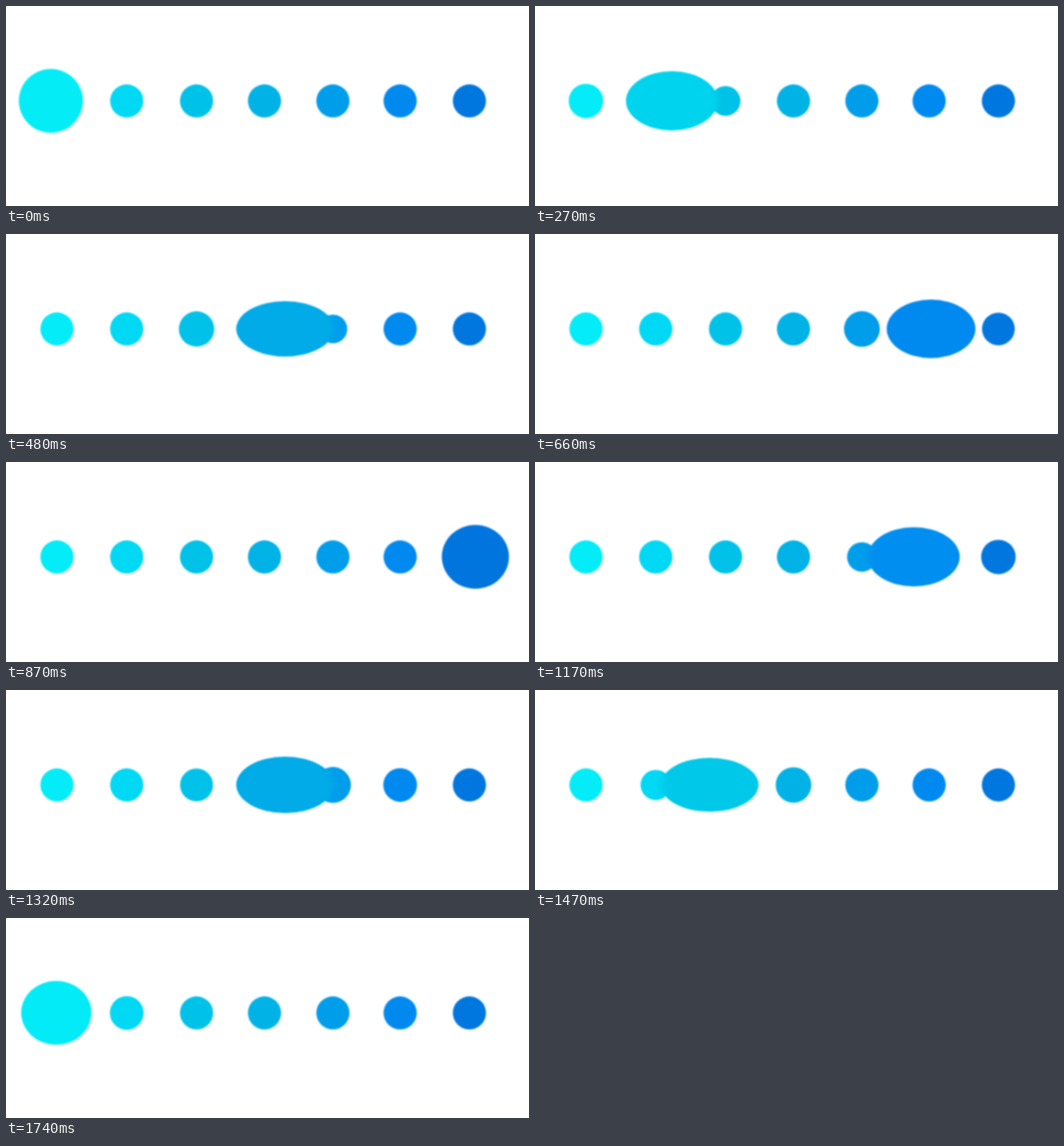
An HTML page without scripts that plays this animation: 746 px wide and 286 px high, repeating every 1770 ms.

```html
<!DOCTYPE html>
<html lang="en">
<head>
<meta charset="utf-8">
<title>Rolling drop</title>
<style>
  @property --f { syntax: "<number>"; inherits: true; initial-value: 0; }

  html, body { margin: 0; width: 100%; height: 100%; overflow: hidden; background: #fff; }

  /* --f counts 30 ms ticks; each leg of the trip takes 30 of them */
  svg {
    display: block; width: 100%; height: 100%;
    animation: tick 1770ms steps(59) infinite;
    --back: clamp(0, var(--f) - 29, 1);
    --leg: calc(var(--f) - 30 * var(--back));
    --q: calc(var(--leg) / 30);
    --ease: calc(var(--q) * var(--q) * (3 - 2 * var(--q)));
    --s: calc(var(--ease) + var(--back) * (1 - 2 * var(--ease)));
  }
  @keyframes tick { from { --f: 0; } to { --f: 59; } }

  /* --p: tick at which the drop passes; --n: ticks since then */
  circle {
    --n: calc(var(--leg) - var(--p) - var(--back) * (30 - 2 * var(--p)));
    --in: clamp(0, (var(--n) + 4.3) * 1.6, 4);
    --out: clamp(0, var(--n) * 3, 6);
    --rest: clamp(0, (var(--n) - 3.5) * 0.65, 2);
    cy: 135.8px;
    r: calc((23.7 - var(--in) + var(--out) - var(--rest)) * 1px);
  }

  .drop {
    cx: calc((64 + 607.5 * var(--s)) * 1px);
    cy: 135.6px;
    rx: calc((45.7 + min(24, 66 * min(var(--q), 1 - var(--q)))) * 1px);
    ry: calc((45.7 - max(0, min(11.4 * var(--q), (24 - var(--leg)) * 1.9))) * 1px);
    fill: rgb(
      calc(max(0, 4 - 40 * var(--s))),
      calc(237 - 120 * var(--s)),
      calc(min(max(247 - 46 * var(--s), 214 + 33 * var(--s)), 321 - 100 * var(--s))));
  }
</style>
</head>
<body>
<svg viewBox="0 0 746 286">
  <!-- melts touching colours together inside the silhouette -->
  <filter id="melt" filterUnits="userSpaceOnUse" x="0" y="0" width="746" height="286" color-interpolation-filters="sRGB">
    <feGaussianBlur in="SourceGraphic" stdDeviation="5"/>
    <feColorMatrix values="1 0 0 0 0  0 1 0 0 0  0 0 1 0 0  0 0 0 20 0"/>
    <feComposite in2="SourceAlpha" operator="in"/>
    <feGaussianBlur stdDeviation="0.9"/>
  </filter>
  <g filter="url(#melt)">
    <circle cx="72.7" fill="#04ecf7" style="--p:3.9"/>
    <circle cx="172.2" fill="#00d8f4" style="--p:8"/>
    <circle cx="271.8" fill="#00c2e8" style="--p:11.8"/>
    <circle cx="368.7" fill="#00b2e6" style="--p:15"/>
    <circle cx="466.3" fill="#009deb" style="--p:18.3"/>
    <circle cx="562.2" fill="#008af0" style="--p:22"/>
    <circle cx="661" fill="#0077de" style="--p:26.1"/>
    <ellipse class="drop"/>
  </g>
</svg>
</body>
</html>
```
